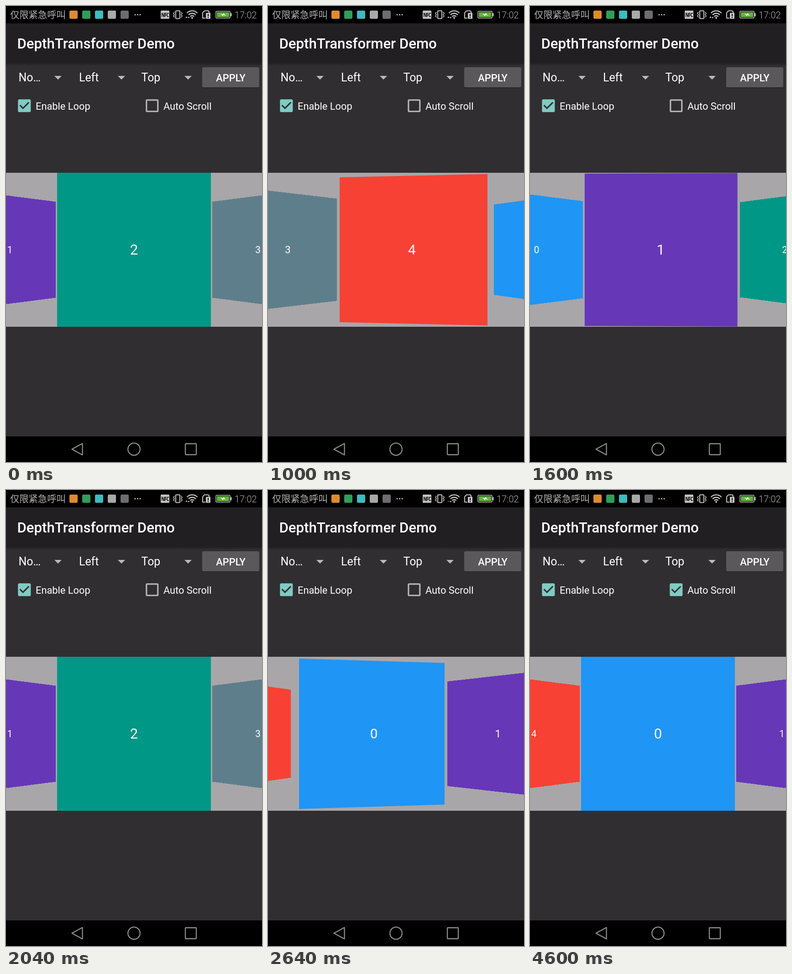
Recreate the animation shown at these times as an HTML page. Size 561 px wide and 998 px high, loop 4.64 s.

```html
<!DOCTYPE html>
<html lang="en">
<head>
<meta charset="utf-8">
<title>DepthTransformer Demo</title>
<style>
  html, body { margin: 0; width: 100%; height: 100%; overflow: hidden; background: #302e31; }
  #stage { position: absolute; left: 0; top: 0; width: 561px; height: 998px; overflow: hidden; background: #302e31; }
  svg { position: absolute; left: 0; top: 0; }
  text { font-family: Roboto, "Noto Sans", sans-serif; fill: #fff; }
  .status { font-size: 20px; fill: #b4b4b4; font-weight: 300; }
  .cjk { font-family: "Noto Sans CJK SC", "Noto Sans CJK", sans-serif; font-size: 20.3px; }
  .title { font-size: 31.17px; font-weight: 500; }
  .spin { font-size: 24.9px; }
  .label { font-size: 21.8px; }
  .bold { font-weight: 500; }
  #pager { position: absolute; left: 0; top: 365px; width: 561px; height: 336.6px; overflow: hidden; background: #a8a6a9; }
  .page {
    position: absolute; left: 112.2px; top: 0; width: 336.6px; height: 336.6px;
    font: 31.17px/338px Roboto, "Noto Sans", sans-serif; color: #fff; text-align: center;
  }
</style>
</head>
<body>
<div id="stage">
  <svg width="561" height="998" viewBox="0 0 561 998">
    <defs>
      <linearGradient id="shade" x1="0" y1="0" x2="0" y2="1">
        <stop offset="0" stop-color="#000" stop-opacity=".3"/>
        <stop offset="1" stop-color="#000" stop-opacity="0"/>
      </linearGradient>
    </defs>

    <!-- status bar -->
    <rect width="561" height="38" fill="#000"/>
    <text class="status cjk" x="9" y="27">仅限紧急呼叫</text>
    <g id="apps"></g>
    <g fill="#c4c4c4">
      <circle cx="283" cy="19" r="1.6"/><circle cx="288.5" cy="19" r="1.6"/><circle cx="294" cy="19" r="1.6"/>
    </g>
    <rect x="339" y="10" width="19" height="18" rx="1.5" fill="#c4c4c4"/>
    <text x="348.5" y="24.5" text-anchor="middle" textLength="" style="font:700 13px 'Noto Sans', sans-serif;fill:#000;letter-spacing:-1px" transform="translate(348.5 0) scale(.72 1) translate(-348.5 0)">NFC</text>
    <g fill="none" stroke="#c4c4c4" stroke-width="2">
      <rect x="372" y="10.5" width="9" height="17" rx="1"/>
      <path d="M369.5 13l-2.5 3 2 3-2 3 2.5 3M383.500 13l2.500 3-2 3 2 3-2.500 3" stroke-width="1.6"/>
      <path d="M396.500 15.500a16 16 0 0 1 23 0M400 19.500a11 11 0 0 1 16 0M403.600 23a6.500 6.500 0 0 1 8.800 0" stroke-width="2.400"/>
    </g>
    <circle cx="408" cy="26" r="2" fill="#c4c4c4"/>
    <g id="traffic" fill="#c4c4c4">
      <path id="up" d="M393 26l2.300-3.500 2.300 3.500z"/>
      <path d="M398 24l2.200 3.500 2.200-3.500z"/>
    </g>
    <path d="M435 10.500h8l2 2v3M431 14.500l4-4M431 14.500v12h6" fill="none" stroke="#c4c4c4" stroke-width="2"/>
    <rect x="438" y="15" width="10" height="13" rx="1" fill="#c4c4c4"/>
    <path d="M443 17.500v5M443 24v2" stroke="#000" stroke-width="2"/>
    <rect x="460" y="11.500" width="31" height="15" rx="2" fill="none" stroke="#c4c4c4" stroke-width="1.500"/>
    <rect x="462" y="13.500" width="27" height="11" fill="#62b43a"/>
    <rect x="492" y="15.500" width="2.500" height="7" fill="#c4c4c4"/>
    <path d="M470 17l6 1.500 0-3 6 5.500-6-1.500v3z" fill="#fff"/>
    <text class="status" x="501" y="27">17:02</text>

    <!-- app bar -->
    <rect y="38" width="561" height="87" fill="#211f22"/>
    <rect y="125" width="561" height="6" fill="url(#shade)"/>
    <text class="title" x="24.500" y="93">DepthTransformer Demo</text>

    <!-- controls -->
    <text class="spin" x="27.500" y="165">No…</text>
    <text class="spin" x="160" y="165">Left</text>
    <text class="spin" x="296.500" y="165">Top</text>
    <path d="M106 153h16l-8 8zM245 153h16l-8 8zM391 153h16l-8 8z" fill="#bbb9bc"/>
    <rect x="430" y="135.500" width="125" height="44" rx="3" fill="#000" opacity=".25"/>
    <rect x="430" y="134" width="125" height="44" rx="3" fill="#5a585b"/>
    <text class="label bold" x="492.500" y="164.500" text-anchor="middle">APPLY</text>

    <g transform="translate(21.600 199.600) scale(1.558)">
      <rect x="3" y="3" width="18" height="18" rx="2" fill="#80cbc4"/>
      <path d="M5.700 11.300L10 15.600 18.300 7.300" fill="none" stroke="#302e31" stroke-width="2"/>
    </g>
    <text class="label" x="65" y="226.500">Enable Loop</text>

    <circle id="ripple" cx="320.300" cy="218.300" r="0" fill="#80cbc4" opacity="0"/>
    <g id="box">
      <rect id="fill" x="-9" y="-9" width="18" height="18" rx="2"/>
      <rect id="hole" x="-7" y="-7" width="14" height="14" fill="#302e31"/>
      <path id="tick" d="M-6.300 -.7L-2 3.600 6.300 -4.700" pathLength="1" fill="none" stroke="#302e31" stroke-width="2"/>
    </g>
    <text class="label" x="345" y="226.500">Auto Scroll</text>

    <!-- navigation bar -->
    <rect y="942" width="561" height="56" fill="#000"/>
    <g fill="none" stroke="#8c8c8c" stroke-width="2.300" stroke-linejoin="round">
      <path d="M144.500 970L167.500 957.500V982.500z"/>
      <circle cx="280.500" cy="970" r="13.300"/>
      <rect x="393" y="958" width="24" height="24" rx="1"/>
    </g>
  </svg>
  <div id="pager"></div>
</div>

<script>
const LOOP = 4640, TICK = 40;
const $ = id => document.getElementById(id);
const clamp = v => Math.min(1, Math.max(0, v));
const ramp = (t, from, to) => clamp((t - from) / (to - from));
const set = (el, attrs) => { for (const k in attrs) el.setAttribute(k, attrs[k]); };

const COLORS = ['#1f95f5', '#6637b7', '#009786', '#5f7e8b', '#f74134'];
const APPS = ['#e08a2e', '#2f9e5a', '#3cbcc0', '#a9a9a9', '#6d6d70'];

// [start, duration, direction] of each swipe
const SWIPES = [
  [548, 300, 1], [840, 250, 1], [1077, 300, 1], [1360, 290, 1], [1700, 330, 1],
  [2128, 380, -1], [2470, 290, -1]
];

APPS.forEach((color, i) => {
  const r = document.createElementNS('http://www.w3.org/2000/svg', 'rect');
  set(r, { x: 139 + 28 * i, y: 10, width: 18, height: 18, rx: 3, fill: color });
  $('apps').append(r);
});

const pages = COLORS.map((color, i) => {
  const p = document.createElement('div');
  p.className = 'page';
  p.textContent = i;
  p.style.background = color;
  $('pager').append(p);
  return p;
});

// slow start under the finger, then a decelerating settle
const swipe = u => 1 - (1 - u ** 1.3) ** 2.5;

const position = t => SWIPES.reduce(
  (pos, [start, span, dir]) => pos + dir * swipe(ramp(t, start, start + span)), 2);

function drawPages(t) {
  const pos = position(t), n = pages.length;
  pages.forEach((page, i) => {
    const d = ((i - pos + 2.5) % n + n) % n - 2.5;
    page.style.visibility = Math.abs(d) < 1.6 ? 'visible' : 'hidden';
    page.style.transform = Math.abs(d) < 1e-6 ? 'none' :
      `translateX(${271.8 * d}px) perspective(299px) rotateY(${-18 * d}deg) scale(${1 - 0.3 * Math.abs(d)})`;
  });
}

function drawCheckbox(t) {
  const close = ramp(t, 3180, 3288), grow = ramp(t, 3290, 3500);
  const size = 1.558 * (1 - 0.08 * close * (1 - grow));
  set($('box'), { transform: `translate(320.3 218.3) scale(${size})` });
  set($('fill'), { fill: close > 0 ? '#80cbc4' : '#b9b7ba' });
  set($('hole'), { transform: `scale(${1 - close})` });
  set($('tick'), { 'stroke-dasharray': `${grow} 2`, opacity: grow > 0 ? 1 : 0 });
  set($('ripple'), {
    r: 31 * Math.sqrt(ramp(t, 3080, 3270)),
    opacity: 0.15 * (1 - ramp(t, 3360, 3640))
  });
}

function draw(now) {
  const t = Math.floor(now % LOOP / TICK) * TICK;
  drawPages(t);
  drawCheckbox(t);
  set($('traffic'), { opacity: t >= 4600 ? 0 : 1 });
  set($('up'), { opacity: t >= 2440 ? 0.4 : 1 });
}

function frame() {
  draw(performance.now());
  requestAnimationFrame(frame);
}
frame();
</script>
</body>
</html>
```
